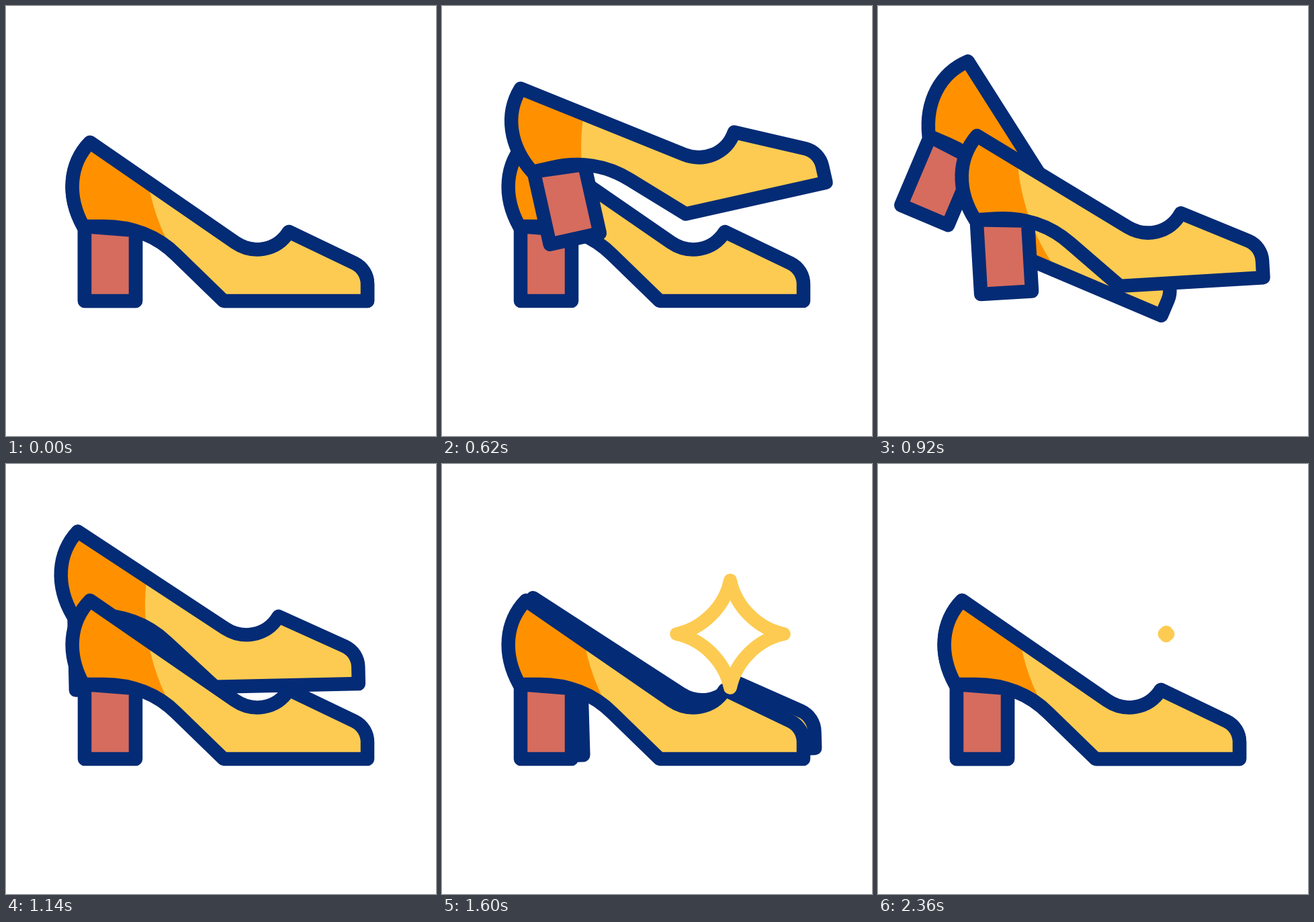
Recreate the animation shown at these times as an HTML page with a canvas. Size 640 px wide and 640 px high, loop 2.4 s.

```html
<!DOCTYPE html>
<html lang="en">
<head>
<meta charset="utf-8">
<title>Walking shoes</title>
<style>
  html, body { margin: 0; width: 100%; height: 100%; overflow: hidden; background: #fff; }
  canvas { display: block; width: 100vmin; height: 100vmin; }
</style>
</head>
<body>
<canvas id="stage" width="640" height="640"></canvas>
<script>
const ctx = document.getElementById('stage').getContext('2d');
const LOOP = 2400;
const STEP_DELAY = 630;
const NAVY = '#042b75', ORANGE = '#ff9100', YELLOW = '#fdcb51', PINK = '#d56c5e';

// Shoe outlines in their resting place
const body = new Path2D(
  'M125 203 L341 352 C366 369 402 366 421 336 L519 383 C531 389 538 401 538 414 ' +
  'V439 H324 L254 371 C225 342 187 328 146 328 H115 C90 283 94 235 125 203 Z');
const heel = new Path2D('M117 328 V439 H193 V334 Z');

// Step poses: time, x, y and angle of the shoe's pivot
const PIVOT = 320;
const makeStep = reach => [
  [0, 320, 320, 0],
  [140, 293, 304, 11.5],
  [230, 268, 279, 22.3],
  [290, 267.5, 266.4, 23],
  [360, 272, 248.7, 19.1],
  [450, 291, 227, 7.3],
  [540, 311, 207, -5],
  [620, 332.5, 194.3, -12.6],
  [695, 352 + reach * 0.6, 213, -11],
  [770, 362 + reach, 245, -7.6],
  [920, 349, 298, -3.4],
  [970, 334, 310.3, -1.7],
  [1030, 324.5, 316.9, -0.54],
  [1090, 320.7, 319.5, -0.1],
  [1170, 320, 320, 0]
];
const frontStep = makeStep(0);
const backStep = makeStep(8.5);

const clamp = v => Math.min(1, Math.max(0, v));
const easeInOut = u => u < 0.5 ? 4 * u ** 3 : 1 - 4 * (1 - u) ** 3;

function slope(keys, i, c) {
  if (i === 0 || i === keys.length - 1) return 0;
  const a = keys[i - 1], b = keys[i + 1];
  return (b[c] - a[c]) / (b[0] - a[0]);
}

// Smooth Hermite curve through the poses
function poseAt(keys, t) {
  const last = keys.length - 1;
  if (t <= 0) return keys[0].slice(1);
  if (t >= keys[last][0]) return keys[last].slice(1);
  const i = keys.findIndex(k => k[0] > t) - 1;
  const a = keys[i], b = keys[i + 1];
  const span = b[0] - a[0], u = (t - a[0]) / span;
  return [1, 2, 3].map(c =>
    a[c] * (1 + 2 * u) * (1 - u) ** 2 +
    b[c] * u * u * (3 - 2 * u) +
    span * (slope(keys, i, c) * u * (1 - u) ** 2 - slope(keys, i + 1, c) * u * u * (1 - u)));
}

function drawShoe([x, y, angle]) {
  ctx.save();
  ctx.translate(x, y);
  ctx.rotate(angle * Math.PI / 180);
  ctx.translate(-PIVOT, -PIVOT);
  ctx.lineWidth = 20.5;
  ctx.strokeStyle = NAVY;

  ctx.fillStyle = PINK;
  ctx.fill(heel);
  ctx.stroke(heel);

  ctx.fillStyle = ORANGE;
  ctx.fill(body);

  // The yellow area is a circle that stays still while the shoe moves
  ctx.save();
  ctx.clip(body);
  ctx.setTransform(1, 0, 0, 1, 0, 0);
  ctx.fillStyle = YELLOW;
  ctx.beginPath();
  ctx.arc(520, 210, 313, 0, Math.PI * 2);
  ctx.fill();
  ctx.restore();

  ctx.stroke(body);
  ctx.restore();
}

function drawStar(t) {
  if (t < 1400) return;
  const open = easeInOut(clamp((t - 1400) / 220)) - easeInOut(clamp((t - 2040) / 320));
  const s = 0.03 + 0.97 * open;
  ctx.save();
  ctx.translate(429, 253);
  ctx.beginPath();
  ctx.moveTo(0, -80 * s);
  for (let i = 0; i < 4; i++) {
    ctx.bezierCurveTo(8 * s, -41 * s, 41 * s, -8 * s, 80 * s, 0);
    ctx.rotate(Math.PI / 2);
  }
  ctx.closePath();
  ctx.lineWidth = 20;
  ctx.strokeStyle = YELLOW;
  ctx.stroke();
  ctx.restore();
}

function draw(t) {
  ctx.fillStyle = '#fff';
  ctx.fillRect(0, 0, 640, 640);
  ctx.lineJoin = ctx.lineCap = 'round';
  drawShoe(poseAt(backStep, t - STEP_DELAY));
  drawShoe(poseAt(frontStep, t));
  drawStar(t);
}

const start = performance.now();
function tick() {
  draw((performance.now() - start) % LOOP);
  requestAnimationFrame(tick);
}
draw(0);
requestAnimationFrame(tick);
</script>
</body>
</html>
```
